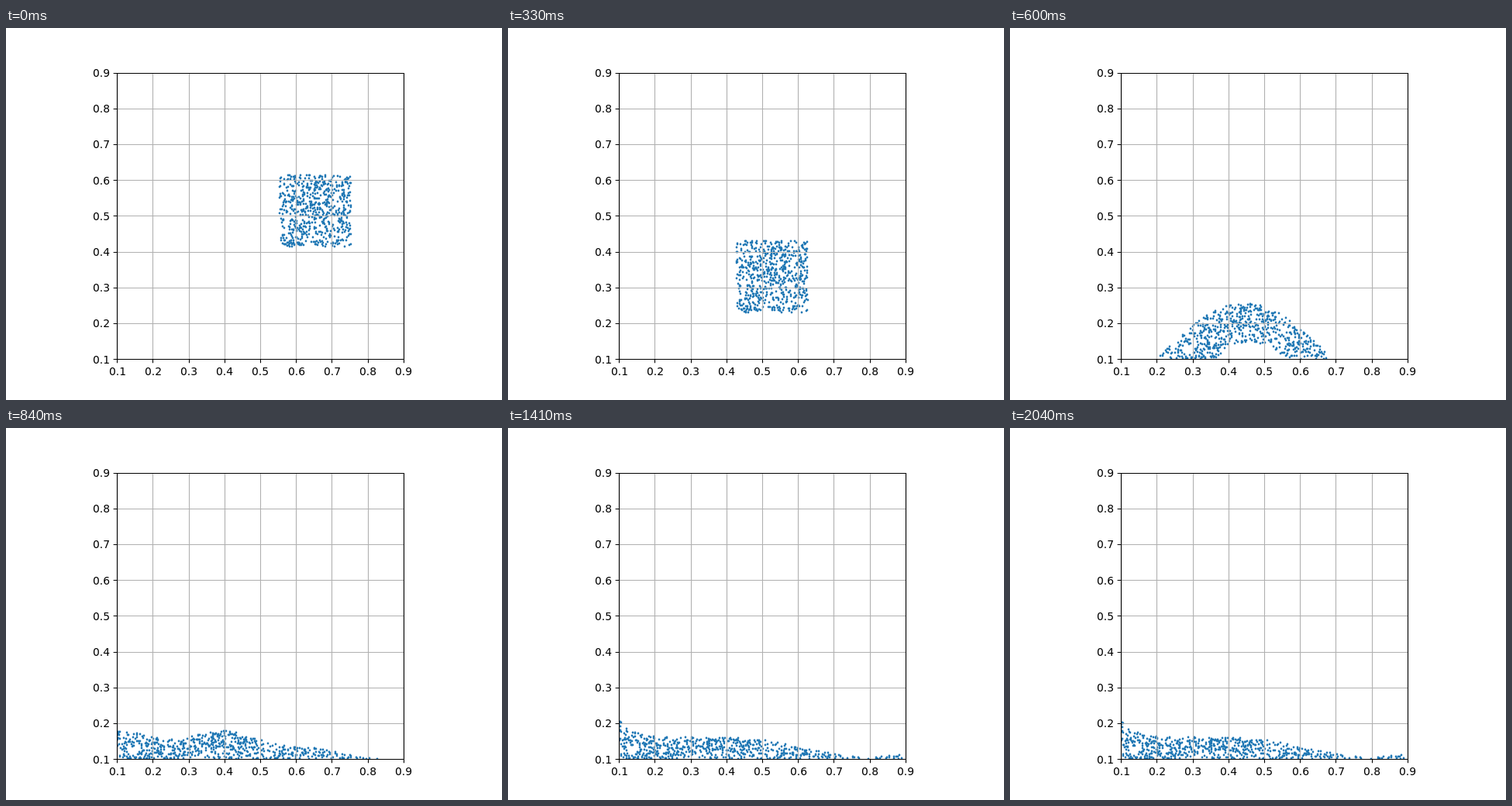
These frames come from a looping animation (640 px wide and 480 px high, 2100 ms). An HTML page:

```html
<!DOCTYPE html>
<html lang="en">
<head>
<meta charset="utf-8">
<title>Falling fluid block</title>
<style>
  html, body { margin: 0; width: 100%; height: 100%; overflow: hidden; background: #fff; }
  svg { display: block; width: 640px; height: 480px; }
  text { font: 13.889px "DejaVu Sans", sans-serif; fill: #000; }
</style>
</head>
<body>
<svg viewBox="0 0 640 480">
  <clipPath id="plot"><rect x="143" y="58" width="370" height="369"/></clipPath>
  <path id="dots" clip-path="url(#plot)" fill="none" stroke="#1f77b4" stroke-width="2.78" stroke-linecap="round"/>
  <path id="grid" clip-path="url(#plot)" fill="none" stroke="#b0b0b0" stroke-width="1.11"/>
  <path id="axes" fill="none" stroke="#000" stroke-width="1.11"/>
  <g id="labels"></g>
</svg>
<script>
const FRAME = 30, FRAMES = 70, LAST = 68, IMPACT = 15;
const COUNT = 640, FLOOR = 0.1, LEFT = 0.1, RIGHT = 0.9;
const $ = id => document.getElementById(id);
const px = x => 143.2 + (x - LEFT) * 462;
const py = y => 427.2 - (y - FLOOR) * 462;
const snap = v => Math.round(v) + 0.5;

function drawAxes() {
  let grid = "", axes = "M143.5 58.5H513.5V427.5H143.5Z", labels = "";
  for (let i = 1; i <= 9; i++) {
    const v = i / 10, x = snap(px(v)), y = snap(py(v));
    grid += `M${x} 57V428M143 ${y}H514`;
    axes += `M${x} 427.5v4.86M143.5 ${y}h-4.86`;
    labels += `<text x="${Math.round(px(v) - 10.65)}" y="448">${v}</text>` +
              `<text x="112" y="${Math.round(py(v) + 5.4)}">${v}</text>`;
  }
  $("grid").setAttribute("d", grid);
  $("axes").setAttribute("d", axes);
  $("labels").innerHTML = labels;
}

function random(seed) {
  return () => {
    seed = (seed + 0x6D2B79F5) | 0;
    let t = Math.imul(seed ^ (seed >>> 15), seed | 1);
    t ^= t + Math.imul(t ^ (t >>> 7), t | 61);
    return ((t ^ (t >>> 14)) >>> 0) / 4294967296;
  };
}

// Free fall of the block, n in frames
const block = n => (u, v) => [
  0.5543 + 0.2 * u - 0.0115 * n,
  0.4135 + 0.2 * v - 0.0084 * n - 0.00075 * n * n
];

// Spreads the unit square evenly over the area between bed and surface
function pool(left, right, surface, bed = () => 0) {
  const steps = 160, dx = (right - left) / steps, sums = [0];
  const depth = x => Math.max(0, surface(x) - bed(x));
  for (let i = 0; i < steps; i++) sums.push(sums[i] + depth(left + (i + 0.5) * dx) + 1e-6);
  return (u, v) => {
    const goal = u * sums[steps];
    let i = 0;
    while (i < steps - 1 && sums[i + 1] < goal) i++;
    const x = left + dx * (i + (goal - sums[i]) / (sums[i + 1] - sums[i]));
    return [x, FLOOR + bed(x) + v * depth(x)];
  };
}

// Parabolic hump; a lift raises its bed into an arch
function dome(center, half, height, lift) {
  const hump = (mid, w, h, power) => x => h * Math.max(0, 1 - ((x - mid) / w) ** 2) ** power;
  return pool(center - half, center + half,
    hump(center, half, height, 1.2), hump(center + 0.02, half * 0.4, lift, 1));
}

function fade(x, from, to) {
  const t = Math.min(1, Math.max(0, (x - from) / (to - from)));
  return 1 - t * t * (3 - 2 * t);
}

const sloshing = pool(LEFT, RIGHT, x =>
  0.002 + (0.065 + 0.012 * Math.cos((x - LEFT) / 0.3 * 2 * Math.PI)) * fade(x, 0.4, 0.85));

// Resting film, piled up against both walls
const resting = pile => pool(LEFT, RIGHT, x =>
  0.06 * fade(x, 0.42, 0.83) + pile * Math.exp((LEFT - x) / 0.035) +
  0.013 * Math.exp(-(((RIGHT - x) / 0.09) ** 2)));

const keys = [
  [IMPACT - 1, block(IMPACT - 1)],
  [IMPACT, block(IMPACT)],
  [18, dome(0.45, 0.17, 0.178, 0)],
  [20, dome(0.445, 0.25, 0.155, 0.046)],
  [28, sloshing],
  [36, resting(0.056)],
  [LAST, resting(0.051)]
];

const rand = random(42);
const particles = Array.from({ length: COUNT }, () => {
  const u = rand(), v = rand();
  return { u, v, path: keys.map(([, place]) => place(u, v)) };
});

const slope = (path, i, c) =>
  (path[i + 1][c] - path[i][c]) / (keys[i + 1][0] - keys[i][0]);

function tangent(path, i, c) {
  if (i === 0) return slope(path, 0, c);
  if (i === keys.length - 1) return 0;
  const a = slope(path, i - 1, c), b = slope(path, i, c);
  return a * b > 0 ? 2 * a * b / (a + b) : 0;
}

// Monotone cubic between key i and key i + 1
function glide(path, i, n, c) {
  const span = keys[i + 1][0] - keys[i][0], s = (n - keys[i][0]) / span;
  const p = path[i][c], q = path[i + 1][c], r = 1 - s;
  return p * r * r * (1 + 2 * s) + q * s * s * (3 - 2 * s) +
    span * s * r * (tangent(path, i, c) * r - tangent(path, i + 1, c) * s);
}

function render(n) {
  let i = 0;
  while (i < keys.length - 2 && keys[i + 1][0] <= n) i++;
  const fall = block(n);
  let d = "";
  for (const { u, v, path } of particles) {
    const [x, y] = n < IMPACT ? fall(u, v) : [0, 1].map(c => glide(path, i, n, c));
    d += `M${Math.round(px(x))} ${Math.round(py(y))}h0`;
  }
  $("dots").setAttribute("d", d);
}

let shown = -1;
const start = performance.now();
function tick() {
  const elapsed = Math.max(0, performance.now() - start);
  const n = Math.min(LAST, Math.floor(elapsed / FRAME) % FRAMES);
  if (n !== shown) render(shown = n);
  requestAnimationFrame(tick);
}

drawAxes();
tick();
</script>
</body>
</html>
```
